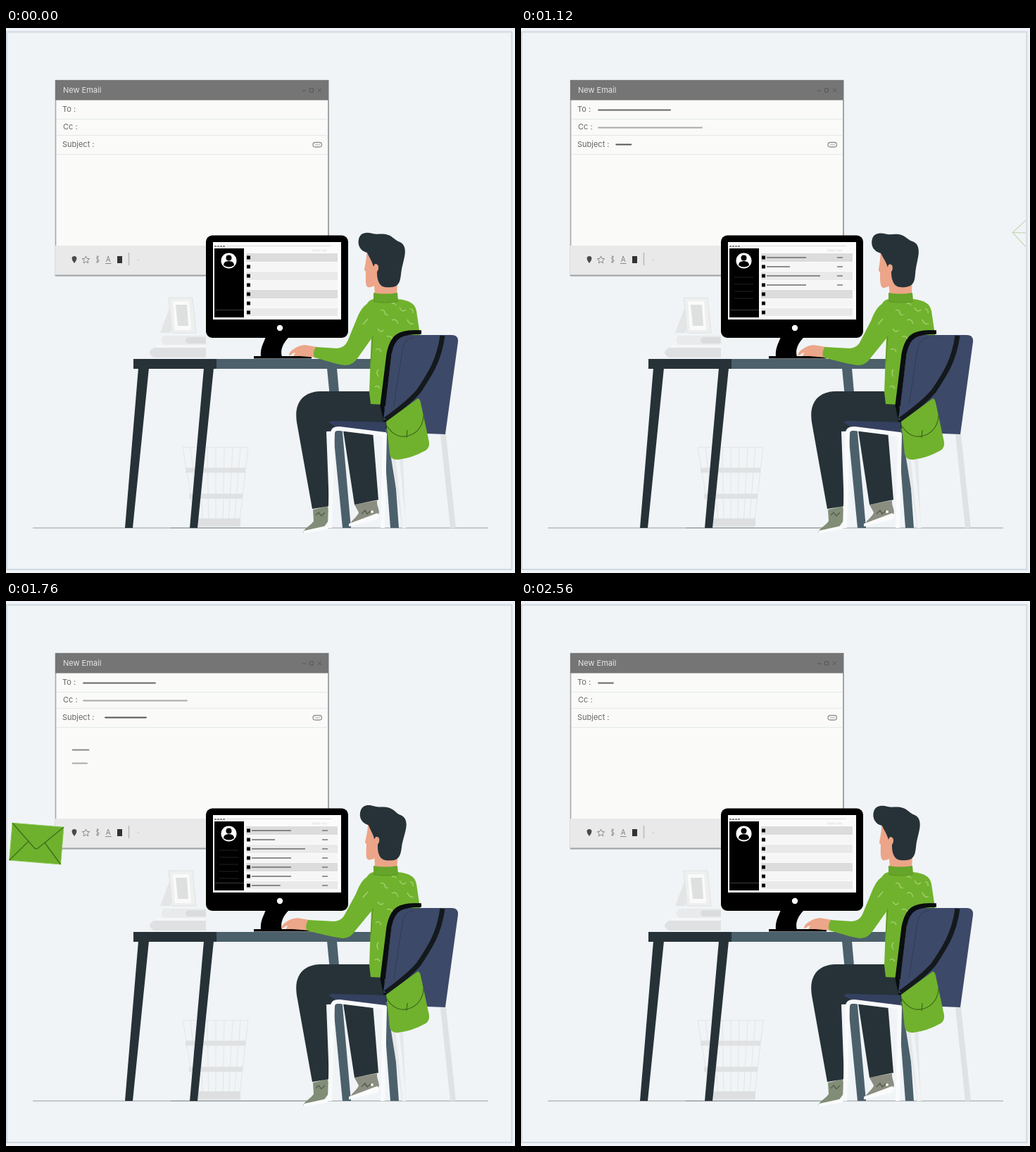
An HTML page that plays this animation: 723x774 px, repeating every 2640 ms.

```html
<!DOCTYPE html>
<html lang="en">
<head>
<meta charset="utf-8">
<title>Writing an email</title>
<style>
html, body { margin: 0; width: 100%; height: 100%; overflow: hidden; background: #f0f4f8; }
svg { display: block; width: 723px; height: 774px; }
text { font: 11px Inter, "Open Sans", sans-serif; fill: #666; }
</style>
</head>
<body>
<svg viewBox="0 0 723 774" xmlns="http://www.w3.org/2000/svg">
  <defs>
    <clipPath id="card"><rect x="1" y="5" width="716" height="764"/></clipPath>
    <path id="paper" d="M-36.5-26.5h73v53h-73z"/>
    <path id="folds" d="M-36.5-26.5L-3 6Q0 9 3 6L36.500-26.500M-36.500 26.500L-11-3M36.500 26.500L11-3" fill="none"/>
  </defs>
  <rect width="723" height="774" fill="#f0f4f8"/>
  <rect x="1" y="5.5" width="717.5" height="763.5" fill="#f0f4f7" stroke="#d0d9df" stroke-width="2"/>

  <!-- email window -->
  <g>
    <rect x="70.5" y="74.5" width="387.5" height="277" fill="#fafbf8" stroke="#a5a7a8" stroke-width="1.6"/>
    <path d="M70 309h387v42H70z" fill="#e9e9ea"/>
    <path d="M70 74h388v28.500H70z" fill="#757575"/>
    <path d="M70 351.500H458V102" fill="none" stroke="#a2a3a5" stroke-width="2"/>
    <path d="M72 129.500H456M72 152.500H456M72 179.500H456" stroke="#e3e8ea"/>
    <text x="81" y="92" style="fill:#e6e6e6">New Email</text>
    <text x="80" y="119">To :</text>
    <text x="81" y="144">Cc :</text>
    <text x="80" y="169">Subject :</text>
    <path d="M421 89h5M431.500 86h5v5h-5zM443 86l5 5m0-5l-5 5" fill="none" stroke="#555"/>
    <rect x="436" y="162.500" width="12.500" height="6.500" rx="3.200" fill="none" stroke="#929292" stroke-width="1.300"/>
    <path d="M439 165.800h7" stroke="#aaa"/>
    <path d="M97 334c-5-6-4-10 0-10s5 4 0 10z" fill="#4a4a4a"/>
    <path d="M113.500 324l1.500 3.300 3.600.4-2.700 2.500.8 3.700-3.200-1.900-3.200 1.900.8-3.700-2.700-2.500 3.600-.4z" fill="none" stroke="#888"/>
    <path d="M130 323v11M132 325c-4-1-4 3-1.500 3.500s2 5-2.500 3.500" fill="none" stroke="#888"/>
    <path d="M142.500 332l2.700-8 2.700 8M143.500 329.500h3.500M141 334.500h8.500" fill="none" stroke="#888"/>
    <path d="M158 324h7v10h-7zM160 323h3" fill="#333"/>
    <path d="M174.500 319v18" stroke="#b9b9b9" stroke-width="1.500"/>
    <path d="M186 329h4" stroke="#d2d2d2"/>
  </g>
  <g id="mail" stroke-width="1.800" stroke-linecap="round"></g>

  <!-- floor and basket -->
  <path d="M38 710H685" stroke="#c3c8cb" stroke-width="2"/>
  <path d="M234 710H440" stroke="#a5abae" stroke-width="1.500"/>
  <g fill="none" stroke="#e3e6e8">
    <path d="M251 595.500H344L331 708H270zM262 596l12 110M274 596l6 110M286 596l2 110M298 596v110M310 596l-2 110M322 596l-6 110M333 596l-9 110"/>
    <path d="M255 628H340M260 665H336" stroke="#dfe1e2" stroke-width="7"/>
    <path d="M270 702H333" stroke="#dedfe0" stroke-width="11"/>
  </g>

  <!-- picture and books -->
  <path d="M236 388L219 433h14L246 396z" fill="#e3e5e6"/>
  <path d="M231 383h34l5 50h-34z" fill="#eeefef" stroke="#e0e2e3"/>
  <path d="M237 388h23l3 41h-23z" fill="#fafafa"/>
  <path d="M241 393h16l2 30h-15z" fill="#dedfdf"/>
  <path d="M224 437h60v13h-60q-7-6 0-13z" fill="#e9eaeb"/>
  <path d="M258 439h26v9h-26q-6-4 0-9z" fill="#dadcdd"/>
  <path d="M212 450h72v5h-70z" fill="#f5f6f6"/>
  <path d="M210 454h74v14h-74q-12-7 0-14z" fill="#dfe0e1"/>

  <g id="sent">
    <use href="#paper" fill="#6eb12d" stroke="#86c44b"/>
    <use href="#folds" stroke="#3f701c" stroke-width="1.400"/>
  </g>
  <g clip-path="url(#card)">
    <g id="gone" fill="none" stroke="#c6d6b0" stroke-width="1.200"><use href="#paper"/><use href="#folds"/></g>
  </g>

  <!-- desk -->
  <g fill="#4b606b">
    <path d="M456 483h14l20 227h-12zM530 500h13l15 210h-12z"/>
    <path d="M299 470H522v14H299z"/>
  </g>
  <g fill="#263237">
    <path d="M181 470H299v14H181z"/>
    <path d="M188 483h15l-23 227h-11zM281 483h14l-23 227h-11z"/>
  </g>

  <!-- computer -->
  <path d="M369 439h33c-8 8-13 17-10 28h-30c-1-12 3-18 7-28zM352 466h82v3.500h-82z"/>
  <rect x="284" y="294.500" width="202" height="145.500" rx="9"/>
  <path d="M294 304H476V414H294z" fill="#fbfbfb"/>
  <path d="M296 313h42v98h-42z"/>
  <path d="M296 310h16" stroke="#666" stroke-width="1.500" stroke-dasharray="3 1"/>
  <path d="M312 309.500h150" stroke="#ddd"/>
  <path d="M435 316h12M449 316h7" stroke="#ededed" stroke-width="3"/>
  <g id="rows"></g>
  <path d="M297 400.500h41" stroke="#3b3b3b"/>
  <circle cx="316.500" cy="330.500" r="11" fill="#fff"/>
  <circle cx="316.500" cy="326.500" r="4"/>
  <path d="M309 337q0-6 7.500-6t7.500 6q-7 5-15 0z"/>
  <circle cx="389" cy="426" r="4.200" fill="#fff"/>

  <!-- man -->
  <path d="M436 684l21-5c1 7 5 14 1 21l-6 8-29 9c-3-4 11-11 14-17z" fill="#828d77"/>
  <path d="M423 714l32-7 5 1-4 4-33 6z" fill="#fbfbfb"/>
  <path d="M495 677l32-6c-1 8 5 14 2 20l-38 15c-6-3 9-12 10-18z" fill="#8b8d80"/>
  <path d="M487 704l40-15 4 3-4 6-40 10z" fill="#fbfbfb"/>
  <path d="M440 692l4-4 4 5 5-5M505 690l5-5 3 5 6-5" fill="none" stroke="#55604f" stroke-width="1.500"/>
  <circle cx="520" cy="687" r="2" fill="#f4f4f4"/>
  <path d="M478 565l43 7 8 98-34 7z" fill="#263237"/>
  <path d="M541 516H446C421 517 409 533 413 560l22 123 24-4-4-106 88-4z" fill="#263237"/>
  <g id="head">
    <path d="M512 312c1 12-1 20-3 31 0 2 2 2 2 3 0 10-1 20 3 22 3 1 7-1 9-2l1 13h31l2-30-30-36z" fill="#eca588"/>
    <path d="M513 319c-9-2-14-10-12-19 2-9 10-11 20-8 7 2 13-1 22 2 6 2 8 6 14 9 10 3 11 12 9 22-2 10-4 15-5 25-1 8-2 17-13 18-9 1-15 0-18-6-3-6-3-11-3-18 0-4 1-9-2-9-2 0-2 4-3 4-2-8-6-13-9-20z" fill="#263238"/>
    <path d="M522 339c2-6 8-4 7 2 0 5-5 8-7 4z" fill="#eca588"/>
  </g>
  <path d="M523 385c14 2 24 1 34 0 16 2 24 6 26 17l6 40-15 95-56-3-2-17 3-80-8-24c-4-12 1-27 11-28z" fill="#70b22d"/>
  <path id="hand" fill="#eca689"/>
  <path id="arm" fill="#70b22d"/>
  <path d="M522 376q17 3 34 0l1 11q-17 4-35 1z" fill="#65a529"/>
  <path d="M521 437l-3 38M522 388q16 4 35 0" fill="none" stroke="#579020"/>
  <path d="M532 401q5-2 6 3t5 3M559 397q4 8 9 3M548 415q7-3 9 5M528 427q4 7 8 2M570 414q3 8 9 6M541 438q7-2 8 5M525 457q5-4 8 3M529 485q-4 4 0 10M524 510q4-4 7 2M514 413l-7 8M548 392q4-3 6 2M574 399q5 0 4 6" fill="none" stroke="#a9d276" stroke-width="1.300"/>

  <!-- chair -->
  <path d="M458 560q4-3 12-2l69 2v15l-71-9z" fill="#34405f"/>
  <path d="M548 598l18 112M561 610l4 100" stroke="#e5e8ea" stroke-width="6"/>
  <path d="M621 577l14 133" stroke="#dfe2e3" stroke-width="8"/>
  <path d="M588 432c-30-2-40 5-45 31l-9 73 5 23" fill="none" stroke="#090c0e" stroke-width="5"/>
  <path d="M569 436h64q10 0 9 10L624 577l-26-1-62-20 12-96c2-18 8-24 21-24z" fill="#3d4968"/>
  <path d="M590 432c-27 0-40 4-45 30l-9 75" fill="none" stroke="#0b0e11" stroke-width="5.500"/>
  <path d="M580 440c-11 0-15 7-17 18l-12 78" fill="none" stroke="#303b57"/>
  <path d="M460 710l4-134q0-8 10-7l64 8-3 133" fill="none" stroke="#f9fafb" stroke-width="6" stroke-linejoin="round"/>
  <path d="M556 610l10 100" stroke="#f1f3f4" stroke-width="5"/>
  <path d="M620 437C615 473 602 492 586 516Q570 534 539 556" fill="none" stroke="#14191c" stroke-width="7"/>
  <path d="M540 559l45-33q3 1 4 6l12 56q1 8-5 12-20 11-39 13-10 1-12-8z" fill="#70b22d"/>
  <path d="M541 565c7 11 17 18 31 14 14-4 21-17 21-29M570 571l-1 11" fill="none" stroke="#3b681b" stroke-width="1.200"/>
</svg>
<script>
const LOOP = 2640, CYCLE = 2400, STEP = 80;
const $ = id => document.getElementById(id);

function add(parent, tag, attrs) {
  const el = document.createElementNS("http://www.w3.org/2000/svg", tag);
  set(el, attrs);
  return parent.appendChild(el);
}
function set(el, attrs) {
  for (const k in attrs) el.setAttribute(k, attrs[k]);
}
const part = (t, from, to) => Math.min(1, Math.max(0, (t - from) / (to - from)));

function ease(keys, t) {
  let i = 0;
  while (i < keys.length - 2 && t >= keys[i + 1][0]) i++;
  const [a, b] = [keys[i], keys[i + 1]];
  const p = part(t, a[0], b[0]);
  return a[1] + (b[1] - a[1]) * p * p * (3 - 2 * p);
}

// x, y, width, start, end, colour, shift while growing
const mail = [
  [110, 116.5, 102, 0, 780, "#666", 0],
  [110, 141.5, 147, 790, 1050, "#aaa", 0],
  [141, 165.5, 58, 1000, 1330, "#555", 9],
  [94.5, 211.5, 23, 1500, 1700, "#888", 0],
  [94.5, 230.5, 103, 1680, 2080, "#aaa", 0]
].map(([x, y, w, from, to, stroke, shift]) =>
  ({ x, w, from, to, shift, el: add($("mail"), "line", { y1: y, y2: y, stroke }) }));

const starts = [480, 690, 840, 960, 1200, 1420, 1640];
const widths = [56, 33, 76, 56, 56, 56, 56];
const tints = ["#dcdcdc", "#f6f6f6", "#e9e9e9", "#f6f6f6"];
const rows = starts.map((start, i) => {
  const y = 326 + 13 * i, g = $("rows");
  add(g, "rect", { x: 341, y: y - 6, width: 130, height: i < 6 ? 12 : 11, fill: tints[i % 4] });
  add(g, "rect", { x: 342, y: y - 2.5, width: 5, height: 5 });
  return {
    start, w: widths[i],
    line: add(g, "line", { x1: 349, y1: y, y2: y, stroke: "#6a6a6a", "stroke-width": 1.6 }),
    dash: add(g, "line", { x1: 449, x2: 457, y1: y, y2: y, stroke: "#777", "stroke-width": 1.5 }),
    menu: i < 5 && add(g, "line", { x1: 303, x2: 330, y1: 354 + 10 * i, y2: 354 + 10 * i, stroke: "#222" })
  };
});

const tilt = [[0, 0], [1000, -2], [1920, 2], [2400, 0]];

function drawArm(t) {
  const d = -12 * Math.sin(Math.PI * part(t, 720, 2320));
  const e = d * 0.35;
  set($("hand"), { d: `M${442 + d} 453l-12-2c-9-2-15 1-20 4-5 3-8 6-8 10 4 0 5-4 9-4-1 2-3 4-2 5l9 0 24 2z` });
  set($("arm"), { d: `M523 387C506 392 502 404 497 416L${485 + e} 445Q${481 + e} 454 ${470 + e} 455L${440 + d} 453Q${435 + d} 460 ${438 + d} 468C${455 + d} 472 ${466 + e} 477 ${481 + e} 479Q${492 + e} 480 ${500 + e} 468L522 437Z` });
}

function draw(time) {
  const t = time % CYCLE;
  for (const m of mail) {
    const p = part(t, m.from, m.to);
    const x = m.x - m.shift * (1 - p);
    set(m.el, { x1: x, x2: x + m.w * p, opacity: p > 0 ? 1 : 0 });
  }
  for (const r of rows) {
    const p = part(t, r.start + 40, r.start + 150), fade = part(t, r.start, r.start + 80);
    set(r.line, { x2: 349 + r.w * p, opacity: p > 0 ? 1 : 0 });
    set(r.dash, { opacity: fade });
    if (r.menu) set(r.menu, { opacity: fade });
  }
  set($("head"), { transform: `rotate(${ease(tilt, t)} 538 380)` });
  drawArm(t);

  const out = (t - 720) / 400;
  set($("gone"), {
    transform: `translate(${482 + 261 * out} ${360 - 75 * out}) rotate(-43)`,
    visibility: t >= 640 && t <= 1280 ? "visible" : "hidden"
  });
  const x = 174.5 - 0.82 * (t - 1600);
  set($("sent"), {
    transform: `translate(${x} ${350.5 + 0.045 * (x - 174.5)}) rotate(4.7)`,
    visibility: t >= 1360 && t < 1920 ? "visible" : "hidden"
  });
}

const begin = performance.now();
function tick() {
  const time = (performance.now() - begin) % LOOP;
  draw(Math.floor(time / STEP) * STEP);
  requestAnimationFrame(tick);
}
tick();
</script>
</body>
</html>
```
